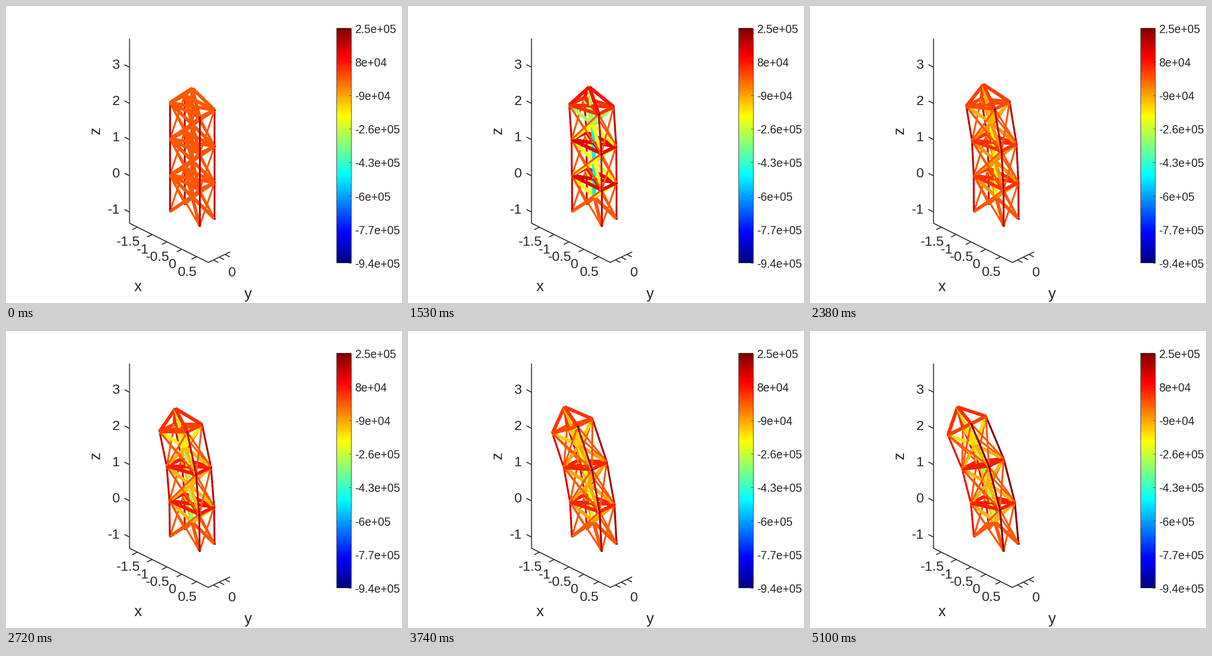
These frames come from a looping animation (864 by 648 pixels, 5.27 s). A matplotlib script:

```python
import numpy as np
import matplotlib.pyplot as plt
from matplotlib.animation import FuncAnimation
from matplotlib.collections import LineCollection
from matplotlib.patches import Rectangle

W, H, FRAMES, STEP = 864, 648, 31, 170
INK = "#262626"
LOW, HIGH = -9.4, 2.5  # stress limits, 1e5
STORIES = 3
SLICES = 8  # bars are cut up so that they hide each other by depth

# Stress of a bar group relative to the pull of the core cable
GAIN = {"chain": -3.3, "crown": -1.9, "brace": -1.25, "floor": 0.85,
        "top": 0.3, "roof": 0.55, "face": 0}

plt.rcParams["font.family"] = "Liberation Sans"
fig = plt.figure(figsize=(W / 72, H / 72), dpi=72, facecolor="white")
ax = fig.add_axes([0, 0, 1, 1])
ax.axis("off")


def ease(t):
    t = np.clip(t, 0, 1)
    return t * t * (3 - 2 * t)


def tilt(k, i):
    """Angle of floor k; the bend starts at the top and runs down."""
    delay = 6 * (STORIES - k)
    return 0.228 * k * ease((i - delay) / (FRAMES - 1 - delay))


def pull(i):
    """Cable force: a damped swing that quickens as it settles."""
    return 1 - np.exp(-i / 18) * np.cos(0.285 * i + 0.0121 * i * i)


def stresses(i):
    p, bend = pull(i), (i / (FRAMES - 1)) ** 3
    values = {group: gain * p for group, gain in GAIN.items()}
    column = 1.8 - 0.15 * p
    values["left"] = column - 0.6 * bend
    values["right"] = column + 0.75 * bend
    return values


def jet(stress):
    x = np.clip((np.asarray(stress, float) - LOW) / (HIGH - LOW), 0, 1)
    return np.stack([np.clip(1.5 - np.abs(4 * x - c), 0, 1) for c in (3, 2, 1)], -1)


def project(p):
    x, y, z = p
    return 390 + 65 * (x + y), 464 + 32 * (x - y) - 79 * z


def depth(p):
    return 0.612 * (p[0] - p[1]) + 0.5 * p[2]


def build_bars():
    """Bars between corners (floor, 0..3) and cell centres (floor, 4)."""
    bars = []

    def add(a, b, group, width=7.5):
        bars.append((a, b, group, width))

    for k in range(STORIES + 1):
        last = k == STORIES
        core = "crown" if k == STORIES - 1 else "chain"
        for c in range(4):
            n = (c + 1) % 4
            add((k, c), (k, 4), "roof" if last else "brace" if k else "face")
            if k:
                add((k, c), (k, n), "top" if last else "floor")
            if not last:
                add((k, c), (k + 1, c), "left" if c in (0, 3) else "right", 4)
                add((k, c), (k + 1, n), "face", 4)
                add((k, n), (k + 1, c), "face", 4)
                add((k + 1, c), (k, 4), "crown" if core == "crown" else "brace")
        if k:
            for c in (0, 1):
                add((k, c), (k, c + 2), "top" if last else "floor")
        if not last:
            add((k, 4), (k + 1, 4), core, 8)
    return bars


BARS = build_bars()


def nodes_at(i):
    rise = 1 - 0.007 * min(1, i / 5)
    x = z = before = 0.0
    nodes, mids = {}, []
    for k in range(STORIES + 1):
        a = tilt(k, i)
        if k:
            m = (a + before) / 2
            x -= rise * np.sin(m)
            z += rise * np.cos(m)
        before = a
        for c in range(4):
            u = 0.5 if c in (1, 2) else -0.5
            nodes[k, c] = np.array([x + u * np.cos(a), c // 2 / 2, z + u * np.sin(a)])
        mids.append(np.array([x, 0.25, z]))
    for k in range(STORIES):
        nodes[k, 4] = (mids[k] + mids[k + 1]) / 2
    nodes[STORIES, 4] = mids[-1] + 0.5 * np.array([-np.sin(a), 0, np.cos(a)])
    return nodes


def slices(p, q):
    """Short pieces of a bar, each slightly overlapping the next."""
    for s in range(SLICES):
        t0, t1 = s / SLICES, min(1, (s + 1.2) / SLICES)
        a, b = p + (q - p) * t0, p + (q - p) * t1
        yield depth((a + b) / 2), [project(a), project(b)]


def label(x, y, s, size, ha="center"):
    """Text with its capitals centred on y."""
    ax.text(x, y + 0.358 * size, s, size=size, color=INK, ha=ha, va="baseline")


def stroke(xs, ys, lw=2):
    ax.plot(xs, ys, color=INK, lw=lw, solid_capstyle="butt", solid_joinstyle="miter")


# Axes
stroke([269.5, 269.5, 441.5, 489], [71, 474, 559.5, 536.5])
for k in range(5):
    y = 448.5 - 79 * k
    stroke([269.5, 258.5], [y + 1, y - 4.5])
    label(248.5, y - 6.2, str(k - 1), 30, "right")
    x, y = 286.5 + 32.3 * k, 482.5 + 16.1 * k
    stroke([x, x - 11], [y, y + 5.5])
    label(x - 20.5, 512.6 + 16.3 * k, f"{-1.5 + 0.5 * k:g}", 30)
for k in range(3):
    x, y = 452.5 + 12.5 * k, 554 - 6 * k
    stroke([x, x + 11], [y, y + 5.5])
label(493, 579, "0", 30)
ax.text(288, 622.5, "x", size=33, color=INK, ha="center")
ax.text(528, 638, "y", size=33, color=INK, ha="center")
ax.text(205, 272, "z", size=33, color=INK, ha="center", va="baseline",
        rotation=90, rotation_mode="anchor")

# Colour bar
TOP, SPAN = 48, 512
ax.imshow(jet(np.linspace(HIGH, LOW, 256))[:, None], aspect="auto",
          extent=(720.5, 752.5, TOP + SPAN, TOP), interpolation="nearest")
ax.add_patch(Rectangle((720.5, TOP + 0.5), 32, SPAN - 0.5, fill=False, ec=INK, lw=1))
for k, value in enumerate(np.linspace(HIGH, LOW, 8) * 1e5):
    y = TOP + SPAN * k / 7
    stroke([748, 753], [y + 0.5] * 2, 0.8)
    label(762, y + 2, f"{value:.2g}", 24.7, "left")

ax.set_xlim(0, W)
ax.set_ylim(H, 0)
truss = LineCollection([], capstyle="butt", zorder=5)
ax.add_collection(truss, autolim=False)


def draw(i):
    nodes = nodes_at(i)
    color = {group: tuple(jet(s)) for group, s in stresses(i).items()}
    parts = []
    for a, b, group, width in BARS:
        for d, line in slices(nodes[a], nodes[b]):
            parts.append((d, line, color[group], width))
    for p in nodes.values():
        x, y = project(p)
        parts.append((depth(p), [(x - 1.6, y), (x + 1.6, y)], (0, 0, 0), 3.2))
    parts.sort(key=lambda part: part[0])
    _, lines, colors, widths = zip(*parts)
    truss.set_segments(lines)
    truss.set_color(colors)
    truss.set_linewidth(widths)
    return [truss]


anim = FuncAnimation(fig, draw, frames=FRAMES, interval=STEP, repeat=True,
                     repeat_delay=0, blit=False)
plt.show()
```
